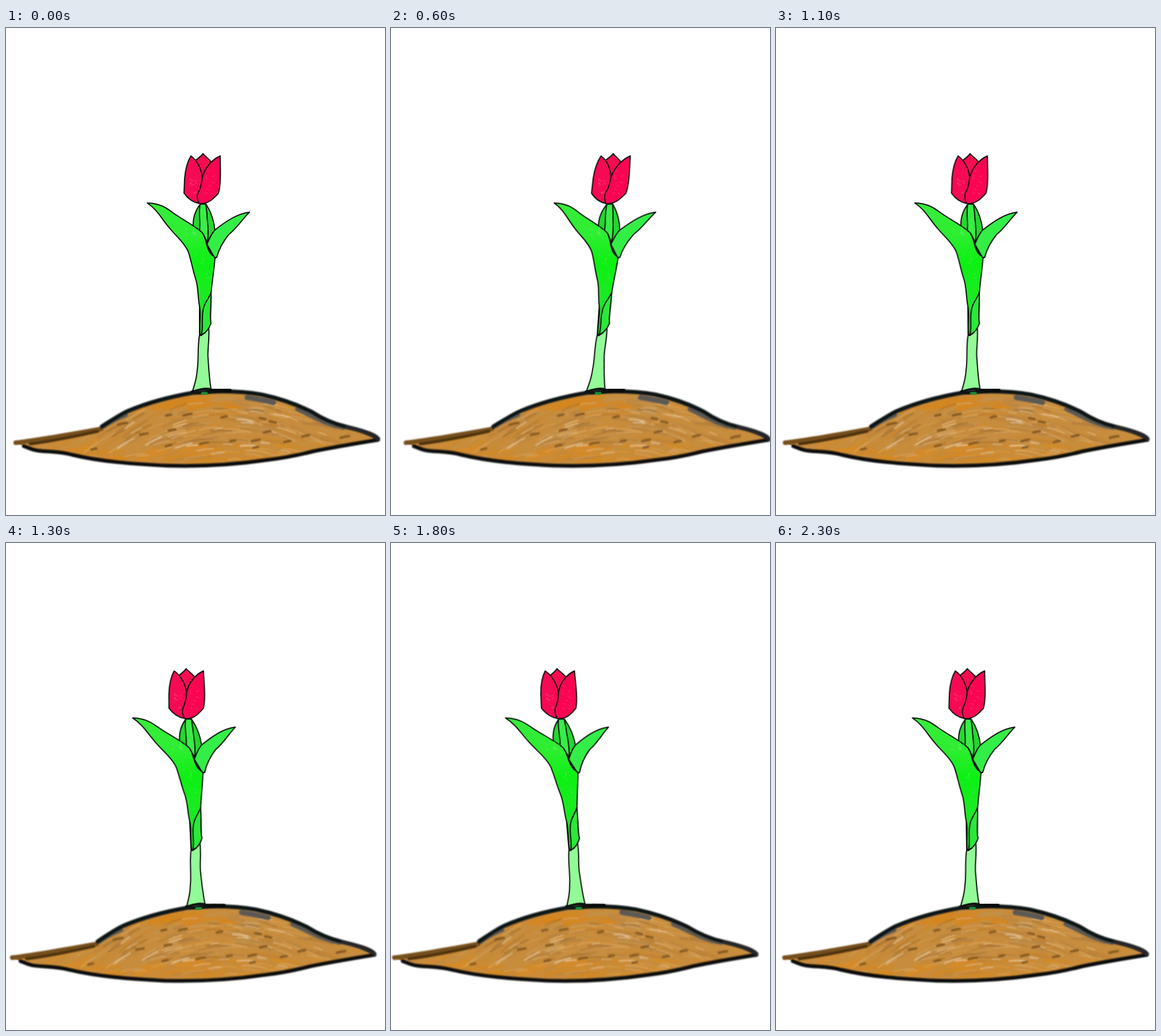
An HTML page that plays this animation: 660x849 px, repeating every 2.4 s.

```html
<!DOCTYPE html>
<html lang="en">
<head>
<meta charset="utf-8">
<title>Swaying tulip</title>
<style>
  html, body { margin: 0; width: 100%; height: 100%; overflow: hidden; background: #fff; }
  svg { display: block; width: 660px; height: 849px; }
  path { stroke-linecap: round; stroke-linejoin: round; }
  .ink { stroke: #0b0f0b; stroke-width: 2; }
  .line { fill: none; }
  #sway { transform-origin: 0 855px; animation: sway 2400ms -1ms infinite; }

  /* Leans right, then left, in hard 100 ms poses. */
  @keyframes sway {
    0%       { transform: skewX(0deg);     animation-timing-function: steps(5); }
    20.8333% { transform: skewX(-4.4deg);  animation-timing-function: steps(1); }
    25%      { transform: skewX(-3.96deg); animation-timing-function: steps(6); }
    50%      { transform: skewX(1.32deg);  animation-timing-function: steps(1); }
    54.1667% { transform: skewX(2.64deg);  animation-timing-function: steps(3); }
    66.6667% { transform: skewX(5.28deg);  animation-timing-function: steps(1); }
    70.8333% { transform: skewX(5.72deg);  animation-timing-function: steps(1); }
    75%      { transform: skewX(4.84deg);  animation-timing-function: steps(5); }
    95.8333% { transform: skewX(.88deg);   animation-timing-function: steps(1); }
    100%     { transform: skewX(0deg); }
  }
</style>
</head>
<body>
<svg viewBox="0 0 660 849">
  <defs>
    <path id="mound" d="M16 723C60 716 120 708 166 699C205 668 260 648 325 636C370 632 410 634 445 640C480 647 506 657 530 669C552 682 580 693 612 700Q648 709 650 718C610 723 570 731 530 741C470 755 400 763 340 764C270 765 200 760 130 748C100 741 75 739 45 735Z"/>
    <clipPath id="inside"><use href="#mound"/></clipPath>
    <filter id="soft" x="-5%" y="-20%" width="110%" height="140%"><feGaussianBlur stdDeviation=".9"/></filter>
    <filter id="smear" x="-5%" y="-20%" width="110%" height="140%"><feGaussianBlur stdDeviation="1"/></filter>
    <linearGradient id="leaf" x1="0" y1="0" x2="0" y2="1">
      <stop offset="0" stop-color="#38ec3c"/>
      <stop offset=".25" stop-color="#2cee30"/>
      <stop offset=".45" stop-color="#0cf012"/>
      <stop offset=".65" stop-color="#18ec20"/>
      <stop offset="1" stop-color="#24dc30"/>
    </linearGradient>
  </defs>

  <g id="sway">
    <!-- soil -->
    <use href="#mound" fill="#c78c3c"/>
    <g clip-path="url(#inside)">
      <g id="soil" class="line" filter="url(#smear)"></g>
    </g>

    <!-- soil outline -->
    <g class="line" filter="url(#soft)">
      <path d="M168 695Q185 683 208 674M420 644Q445 648 466 653M508 664C535 676 555 690 588 696" stroke="#5b5853" stroke-width="9"/>
      <path d="M17 723C60 718 115 708 165 699" stroke="#76501d" stroke-width="8"/>
      <path d="M42 725C80 720 120 712 160 703" stroke="#4e320d" stroke-width="5"/>
      <path d="M167 695C184 684 198 674 214 667C250 652 290 642 325 636C370 632 410 633 445 639C478 646 506 656 532 669C552 682 570 690 592 695C612 700 640 707 647 715" stroke="#101214" stroke-width="7"/>
      <path d="M31 729C42 733 46 736 57 737C75 739 95 738 115 744C165 756 220 760 280 763C345 765 400 761 455 753C482 750 508 745 535 738C570 731 605 725 648 718" stroke="#0c0f11" stroke-width="6.5"/>
      <path d="M594 696Q626 702 648 716" stroke="#25272a" stroke-width="7"/>
    </g>

    <!-- foot of the stem -->
    <path class="ink line" d="M328 634L342 629L358 633L372 630L391 632L362 635L331 636" stroke-width="4"/>
    <path d="M357 632L390 632" stroke="#080b09" stroke-width="6"/>
    <path d="M324 634Q340 639 362 634" class="line" stroke="#0d1510" stroke-width="4"/>

    <!-- lower stem -->
    <path class="ink" fill="#92fa96" d="M337 535C333 558 336 577 333 596C332 613 328 622 325 633C337 630 346 626 357 629C354 612 353 593 352 577C350 561 355 545 353 520Z"/>
    <path class="line" stroke="#0d1510" stroke-width="3.5" d="M328 633Q340 629 356 630"/>
    <path d="M342 637L349 637" stroke="#1d8b36" stroke-width="5"/>

    <!-- back leaves and upper stem -->
    <path class="ink" fill="#22d82e" d="M337 309C328 321 325 333 326 348L344 366L354 372L364 354C362 333 356 319 349 308Z"/>
    <path class="ink" fill="#38ee46" d="M338 307C335 324 339 339 337 352L351 373C354 350 350 338 350 324L348 307Z"/>

    <!-- right leaf -->
    <path class="ink" fill="#34ee48" d="M424 321C402 324 383 337 364 352C357 359 353 370 350 377L363 400L367 400C371 384 379 371 388 360C402 349 411 334 424 321Z"/>

    <!-- left leaf -->
    <path class="ink" fill="url(#leaf)" d="M246 305C270 306 280 314 292 323C309 335 328 344 342 357C349 366 349 379 355 390L364 401C362 425 358 447 357 465L356 516L340 536L337 533L337 485C334 470 335 454 331 440C325 422 322 402 317 389C309 372 296 363 285 349C271 333 264 317 246 305Z"/>
    <path class="ink" fill="#2be83a" d="M357 461C353 473 344 480 343 493C340 508 344 522 340 536C347 532 353 526 357 515C354 500 358 481 357 461Z"/>
    <path class="ink line" stroke-width="2.6" d="M343 359C350 370 348 384 357 394L365 401M337 485C340 499 336 518 338 536L347 531"/>

    <!-- bloom -->
    <path class="ink" fill="#f90b52" d="M329 232C334 227 339 225 343 219C347 224 352 227 357 233L343 260Z"/>
    <path class="ink" fill="#f60a54" d="M322 223C316 233 312 249 311 263L310 288C317 298 325 304 337 306L342 262C341 246 333 231 322 223Z"/>
    <path class="ink" fill="#fb0553" d="M373 223C359 229 346 244 342 260C341 270 339 280 334 288C332 296 334 301 336 306C351 308 361 298 370 288C375 270 373 245 373 223Z"/>
    <g id="chalk" class="line"></g>
  </g>
</svg>

<script>
  let seed = 29;
  const rand = () => (seed = (seed * 16807) % 2147483647) / 2147483647;
  const between = (a, b) => a + (b - a) * rand();
  const pick = list => list[Math.floor(rand() * list.length)];

  function stroke(parent, x, y, len, angle, color, width, opacity) {
    const dx = Math.cos(angle) * len / 2, dy = Math.sin(angle) * len / 2;
    const path = document.createElementNS("http://www.w3.org/2000/svg", "path");
    path.setAttribute("d", `M${x - dx} ${y - dy}Q${x} ${y - len * .06} ${x + dx} ${y + dy}`);
    path.setAttribute("stroke", color);
    path.setAttribute("stroke-width", width);
    path.setAttribute("opacity", opacity);
    parent.append(path);
  }

  const soil = document.getElementById("soil");
  // Strokes climb on the left, level out and fall on the right.
  const slope = (x, y) => Math.max(-.5, Math.min(.28, (x - 390) / 330)) * (y > 735 ? .4 : 1) + between(-.14, .14);

  function scatter(count, colors, len, width, opacity, box) {
    for (let i = 0; i < count; i++) {
      const x = between(box[0], box[1]), y = between(box[2], box[3]);
      stroke(soil, x, y, between(len * .6, len * 1.4), slope(x, y), pick(colors), between(width * .6, width * 1.3), opacity);
    }
  }

  scatter(70, ["#d18a30", "#c98730", "#bc8038"], 50, 6, .65, [60, 620, 642, 762]);
  scatter(65, ["#b98543", "#b07c3a", "#c4924f"], 46, 4, .65, [200, 560, 648, 728]);
  scatter(40, ["#d88a26", "#d38822"], 44, 5, .7, [90, 600, 728, 760]);
  scatter(20, ["#d6861f"], 40, 5, .7, [215, 400, 645, 662]);
  scatter(26, ["#96682c", "#9c6c32"], 28, 2.4, .55, [190, 500, 660, 725]);
  scatter(60, ["#dcae6c", "#d8a55e"], 34, 1.8, .7, [140, 570, 650, 752]);
  scatter(34, ["#edd3a8", "#f3e0c2"], 24, 1.5, .75, [150, 560, 655, 750]);

  const flecks = [
    [283, 675], [316, 674], [203, 690], [240, 708], [289, 701], [345, 724], [395, 720],
    [435, 719], [455, 704], [447, 681], [464, 687], [490, 721], [435, 731], [153, 734],
    [522, 711], [590, 713], [283, 728], [380, 678]
  ];
  for (const [x, y] of flecks)
    stroke(soil, x, y, between(8, 16), x > 440 && y < 690 ? .2 : -.2, "#80541f", 4.2, .9);

  // Pale gaps left by the crayon.
  const chalk = document.getElementById("chalk");
  const tick = (x, y, color) => stroke(chalk, x, y, between(2, 5), between(-1.2, .6), color, 1.2, .5);
  for (let i = 0; i < 9; i++) {
    tick(between(316, 332), between(262, 294), "#ff6f9c");
    tick(between(348, 368), between(248, 290), "#ff5c8e");
    tick(between(312, 336), between(345, 362), "#8cf58f");
    tick(between(328, 352), between(395, 440), "#62f06a");
  }
</script>
</body>
</html>
```
